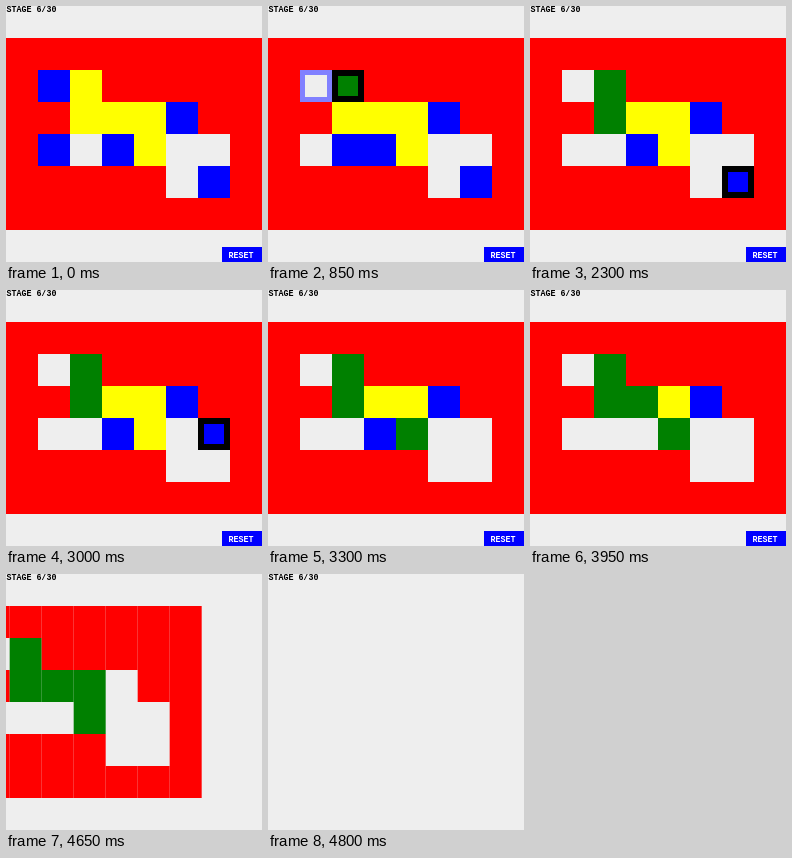
An HTML page for the animation above (5 s loop, 256 by 256 pixels).

```html
<!DOCTYPE html>
<html>
<head>
<meta charset="utf-8">
<style>
  html, body { margin: 0; width: 100%; height: 100%; overflow: hidden; background: #eee; }
  svg { display: block; width: 100vw; height: 100vh; }
  text { font: bold 8.33px "Liberation Mono", "DejaVu Sans Mono", monospace; }
</style>
</head>
<body>
<svg viewBox="0 0 256 256">
  <rect width="256" height="256" fill="#eee"/>
  <g id="board"></g>
  <text x="0.6" y="6.2">STAGE 6/30</text>
  <g id="reset">
    <rect x="216" y="241" width="40" height="15" fill="#00f"/>
    <text x="222.6" y="252.2" fill="#fff">RESET</text>
  </g>
</svg>
<script>
const LOOP = 5000, TICK = 50, CELL = 32, TOP = 32, TRAIL = 200;
const CLEAR = { start: 4440, length: 340, hideReset: 4450 };

// # wall, o goal, B block, . floor
const MAP = [
  '########',
  '#Bo#####',
  '##oooB##',
  '#B.Bo..#',
  '#####.B#',
  '########'
];

// age: how far the trail has already shrunk when the block jumps
const MOVES = [
  { from: [1, 3], to: [2, 3], press: 100, jump: 250, age: 50 },
  { from: [1, 1], to: [2, 1], press: 750, jump: 850, age: 0 },
  { from: [2, 3], to: [2, 2], press: 1450, jump: 1500, age: 0 },
  { from: [6, 4], to: [6, 3], press: 2300, jump: 2400, age: 50 },
  { from: [6, 3], to: [4, 3], press: 3000, jump: 3150, age: 50 },
  { from: [3, 3], to: [3, 2], press: 3700, jump: 3800, age: 50 },
  { from: [5, 2], to: [4, 2], press: 4400, jump: 4450, age: 0 }
];

const board = document.getElementById('board');
const reset = document.getElementById('reset');

const box = (x, y, w, h) => `M${x} ${y}h${w}v${h}h${-w}z`;

const cell = (x, y, fill) =>
  `<rect x="${x * CELL}" y="${TOP + y * CELL}" width="${CELL}" height="${CELL}" fill="${fill}"/>`;

function frame(x, y, w, h, bx, by, fill) {
  const d = box(x, y, w, h) + box(x + bx, y + by, w - 2 * bx, h - 2 * by);
  return `<path d="${d}" fill="${fill}" fill-rule="evenodd"/>`;
}

function trail({ from, to }, k) {
  const pos = [], size = [], border = [];
  for (const a of [0, 1]) {
    const delta = to[a] - from[a];
    const full = CELL * Math.max(1, Math.abs(delta));
    size[a] = delta ? full * k : full;
    border[a] = delta ? 5 * k : 5;
    // the side next to the destination stays put
    pos[a] = delta > 0 ? to[a] * CELL - size[a]
           : delta < 0 ? (to[a] + 1) * CELL
           : from[a] * CELL;
  }
  return frame(pos[0], TOP + pos[1], ...size, ...border, '#8080ff');
}

function draw(t) {
  const blocks = new Set();
  MAP.forEach((row, y) => [...row].forEach((c, x) => c === 'B' && blocks.add(x + ',' + y)));

  let marks = '';
  for (const m of MOVES) {
    if (t < m.press) break;
    const moved = t >= m.jump;
    if (moved) {
      blocks.delete(m.from.join());
      blocks.add(m.to.join());
      const k = 1 - (t - m.jump + m.age) / TRAIL;
      if (k > 0) marks += trail(m, k);
    }
    if (t < m.jump + TICK) {
      const [x, y] = moved ? m.to : m.from;
      marks += frame(x * CELL, TOP + y * CELL, CELL, CELL, 6, 6, '#000');
    }
  }

  let cells = '';
  MAP.forEach((row, y) => [...row].forEach((c, x) => {
    const block = blocks.has(x + ',' + y);
    const fill = c === '#' ? '#f00'
      : c === 'o' ? (block ? '#008000' : '#ff0')
      : block ? '#00f' : '';
    if (fill) cells += cell(x, y, fill);
  }));

  const p = Math.min(1, Math.max(0, (t - CLEAR.start) / CLEAR.length));
  board.innerHTML = cells + marks;
  board.setAttribute('transform', `translate(${-256 * p ** 3} 0)`);
  board.style.display = p < 1 ? '' : 'none';
  reset.style.display = t < CLEAR.hideReset ? '' : 'none';
}

const start = performance.now();
function tick() {
  const t = (performance.now() - start) % LOOP;
  draw(Math.floor(t / TICK) * TICK);
  requestAnimationFrame(tick);
}
tick();
</script>
</body>
</html>
```
